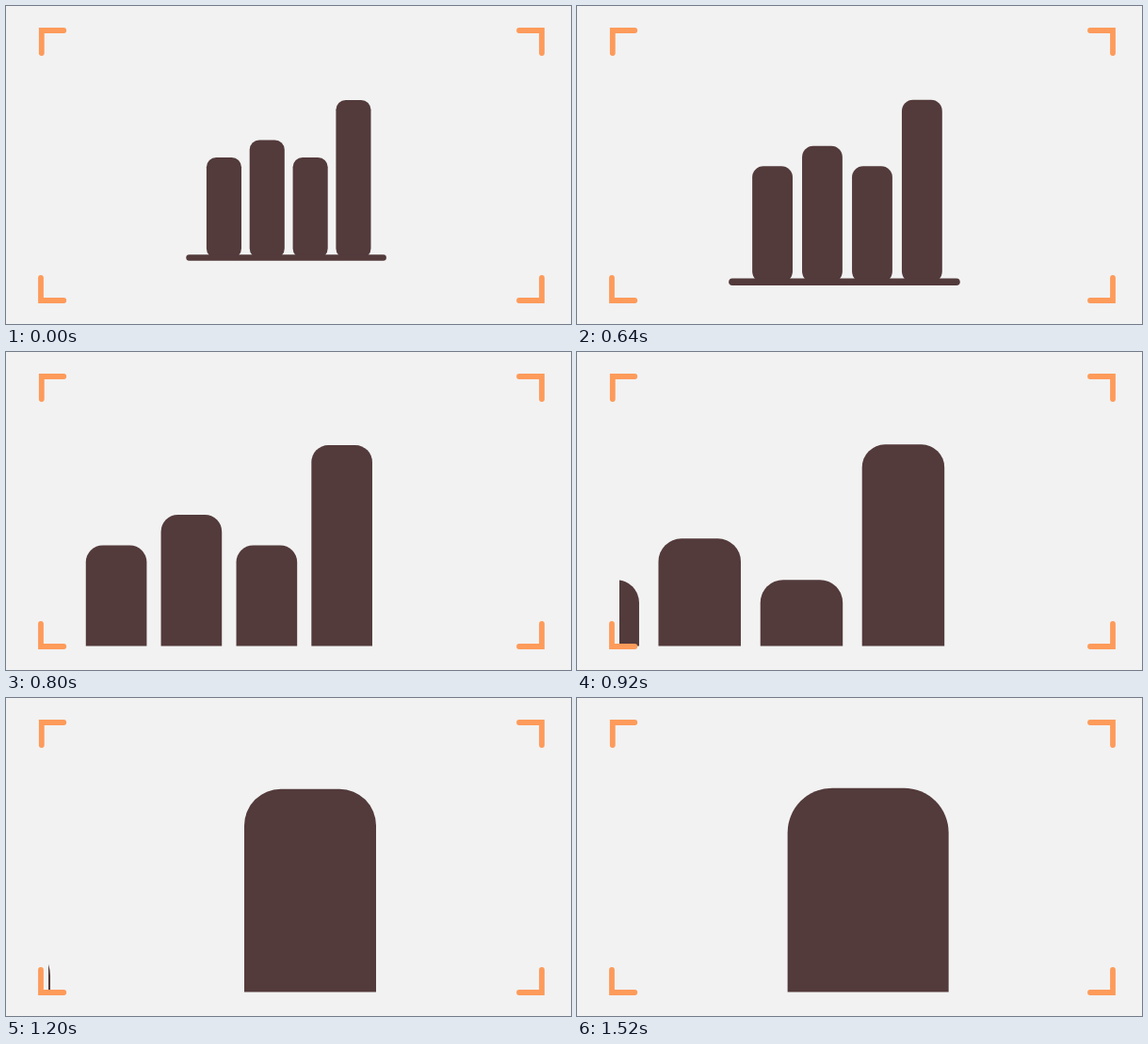
An HTML page for the animation above (2 s loop, 600 by 338 pixels).

```html
<!DOCTYPE html>
<html lang="en">
<head>
<meta charset="utf-8">
<title>Bar chart zoom</title>
<style>
  html, body { margin: 0; height: 100%; overflow: hidden; background: #f2f2f2; }
  svg { display: block; width: 600px; height: 338px; }
</style>
</head>
<body>
<svg viewBox="0 0 600 338">
  <clipPath id="view"><rect x="45" y="24" width="517" height="288.4"/></clipPath>
  <g clip-path="url(#view)">
    <g id="chart" fill="#533a3b">
      <rect x="212.9" y="161" width="37.1" height="107" rx="10.3"/>
      <rect x="258.7" y="142.4" width="37.1" height="125.6" rx="10.3"/>
      <rect x="304.6" y="161" width="37.1" height="107" rx="10.3"/>
      <rect x="350.4" y="100" width="37.1" height="168" rx="10.3"/>
      <rect x="191.3" y="264.2" width="212.6" height="6.6" rx="3.3"/>
    </g>
  </g>
  <path fill="none" stroke="#fd9b5b" stroke-width="5.8" stroke-linecap="round"
    d="M61.3 26H37.8V50 M545 26H569V50 M37 289V313H61.3 M569 289V313H545"/>
</svg>
<script>
  const LOOP = 2000, STEP = 40, START = 520, DURATION = 960;
  const MAX_ZOOM = 4.61, PIVOT = { x: 385.52, y: 101.2 };
  const chart = document.getElementById('chart');
  const clamp = v => Math.min(1, Math.max(0, v));
  const smooth = u => u * u * (3 - 2 * u);

  function zoomAt(time) {
    const lag = 20 * clamp((time - 920) / 160); // slight hesitation midway
    return 1 + (MAX_ZOOM - 1) * smooth(clamp((time - START - lag) / DURATION));
  }

  function draw(now) {
    const zoom = zoomAt(Math.floor((now % LOOP) / STEP) * STEP);
    chart.setAttribute('transform',
      `translate(${PIVOT.x} ${PIVOT.y}) scale(${zoom}) translate(${-PIVOT.x} ${-PIVOT.y})`);
    requestAnimationFrame(() => draw(performance.now()));
  }
  draw(performance.now());
</script>
</body>
</html>
```
